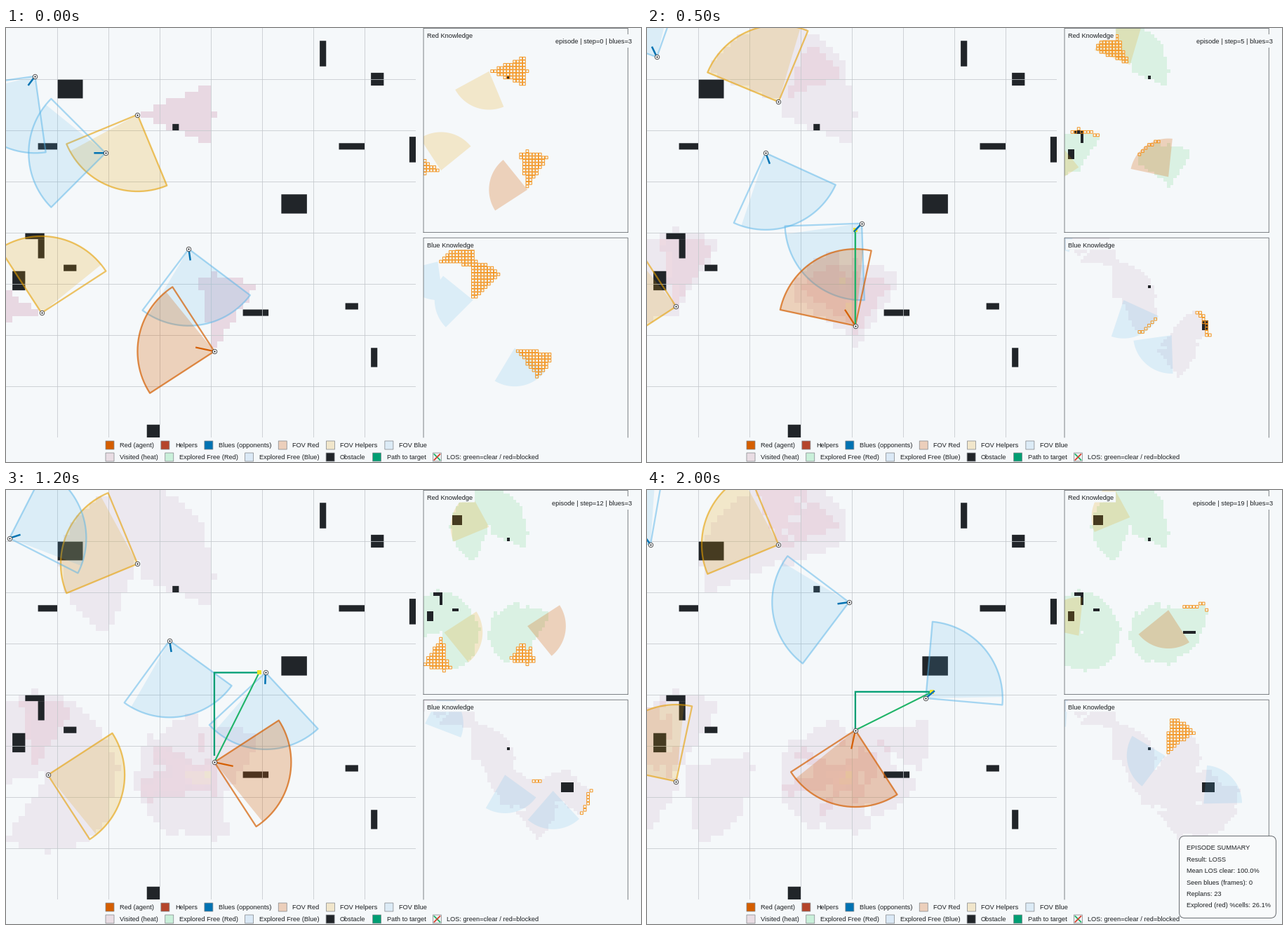
A matplotlib script that plays this animation: 905 by 619 pixels, repeating every 2.1 s.

```python
import numpy as np
import matplotlib.pyplot as plt
from matplotlib.animation import FuncAnimation
from matplotlib.collections import PolyCollection
from matplotlib.colors import LinearSegmentedColormap
from matplotlib.patches import FancyBboxPatch, PathPatch, Rectangle
from matplotlib.path import Path

W, H, DPI = 905, 619, 64
PX = 72 / DPI                      # one pixel in points
U = 73 / 96                        # layout unit: map cells are 12 units wide
N, REACH, LAST = 64, 12, 19        # map size, view radius, last step
MID = .54                          # centre of a cell
BG, INK, DARK = "#f5f8fa", "#1c1f22", "#212529"
RED, BLUE, TEAL, LOS = "#d55e00", "#0072b2", "#009e73", "#1fb468"
ORANGE = "#f39118"

# view colour, fill alpha, outline alpha, drawing order
STYLE = {"helper": ("#e69f00", .19, .60, 4), "blue": ("#56b4e9", .16, .50, 5),
         "red": (RED, .25, .70, 6)}

OBSTACLES = [(8, 8, 4, 3), (49, 2, 1, 4), (57, 7, 2, 2), (63, 17, 1, 4),
             (5, 18, 3, 1), (52, 18, 4, 1), (26, 15, 1, 1), (43, 26, 4, 3),
             (3, 32, 3, 1), (5, 33, 1, 3), (9, 37, 2, 1), (1, 38, 2, 3),
             (37, 44, 4, 1), (53, 43, 2, 1), (57, 50, 1, 3), (22, 62, 2, 2)]
wall = np.zeros((N, N), bool)
for c, r, w, h in OBSTACLES:
    wall[r:r + h, c:c + w] = True

steps = np.arange(LAST + 1)


def walk(kind, *keys, start=0, turn=None):
    """Agent moving cell by cell through (step, col, row, heading) points.

    With turn set, headings count whole turns of that many degrees."""
    at, col, row, heading = np.array(keys, float).T
    col, row = (np.ceil(np.interp(steps, at, v) - .5).astype(int)
                for v in (col, row))
    heading = np.interp(steps, at, heading)
    if turn:
        heading = start + turn * np.floor(heading + .5)
    return dict(kind=kind, col=col, row=row, heading=heading)


# the red agent turns on every third step and moves up on the others
thirds = steps // 3
red = dict(kind="red", col=0 * steps + 32, row=50 - steps + thirds,
           heading=192 + 45 * thirds)
helpers = [
    walk("helper", (0, 20, 13, 0), (1, 20, 13, 1), (3, 20, 11, 1),
         (7, 20, 11, 5), (9, 20, 11, 3), (12, 20, 11, 2), (15, 20, 9, 1),
         (19, 20, 8, 2), start=112.5, turn=45),
    walk("helper", (0, 5, 44, 0), (3, 4, 44, 2), (6, 4, 43, 2), (7, 4, 43, 3),
         (9, 5, 43, 4), (12, 6, 44, 6), (15, 5, 45, 8), (19, 4, 45, 9),
         start=282, turn=-45),
]
blues = [
    walk("blue", (0, 4, 7, 127), (3, 2, 4, 232), (7, 0, 4, 257),
         (9, 0, 4, 282), (12, 0, 7, 342), (15, 0, 9, 326), (19, 0, 8, 235)),
    walk("blue", (0, 15, 19, 180), (3, 17, 18, 68), (7, 20, 20, 71),
         (9, 22, 21, 55), (12, 25, 23, 81), (15, 28, 21, 120),
         (18, 30, 18, 130), (19, 31, 17, 172)),
    walk("blue", (0, 28, 34, 82), (2, 30, 33, 142), (7, 35, 28, 127),
         (9, 37, 28, 103), (12, 40, 28, 92), (14, 42, 28, 98),
         (15, 42, 28, 100), (18, 44, 31, 0), (19, 43, 32, -40)),
]
reds = helpers + [red]
gy, gx = np.mgrid[:N, :N]


def seen(a, s):
    """Cells sensed by an agent: a 45 degree sector, mirrored to the drawn one."""
    dx, dy = gx - a["col"][s], gy - a["row"][s]
    dist = np.hypot(dx, dy)
    off = np.degrees(np.arctan2(dy, dx)) - (112.5 - a["heading"][s])
    off = (off + 180) % 360 - 180
    return (dist > 0) & (dist <= REACH) & (abs(off) <= 22.501)


def explore(team):
    """Per step: (visit counts, cells known before, new cells)."""
    count, log = np.zeros((N, N), int), []
    for s in steps:
        known = count > 0
        count = count + sum(seen(a, s).astype(int) for a in team)
        log.append((count, known, (count > 0) & ~known))
    return log


red_log, blue_log = explore(reds), explore(blues)
HEAT = LinearSegmentedColormap.from_list("heat", [
    (0, "#ece9f0"), (.4, "#ece8ef"), (.5, "#e8d8e2"), (.8, "#eddae2"),
    (1, "#ede3d3")])


def heat_image(count):
    t = count / max(2, count.max())
    img = HEAT(t)
    img[..., 3] = t > .11
    return img


def known_image(known, new, rgb):
    img = np.zeros((N, N, 4))
    img[known] = (*rgb, 1)
    img[(known | new) & wall] = (.13, .145, .16, 1)
    return img


def sector(a, s, span):
    ang = np.radians(a["heading"][s] - 45 + np.linspace(0, span, 31))
    x, y = a["col"][s] + MID, a["row"][s] + MID
    arc = np.c_[x + REACH * np.cos(ang), y + REACH * np.sin(ang)]
    return np.vstack([(x, y), arc, (x, y)])


plt.rcParams["font.family"] = "Liberation Sans"
fig = plt.figure(figsize=(W / DPI, H / DPI), dpi=DPI, facecolor=BG)


def make_axes(x, y, w, h, xmax, ymax, z=1):
    ax = fig.add_axes([x / W, 1 - (y + h) / H, w / W, h / H], zorder=z)
    ax.set(xlim=(0, xmax), ylim=(ymax, 0), autoscale_on=False)
    ax.axis("off")
    return ax


MAP, SIDE = 768 * U, 384 * U
LEFT, BLUE_TOP = 782 * U, 393 * U
main = make_axes(0, 0, MAP, MAP, N, N)
red_ax = make_axes(LEFT, 0, SIDE, SIDE, N, N)
blue_ax = make_axes(LEFT, BLUE_TOP, SIDE, MAP - BLUE_TOP,
                    N, N * (MAP - BLUE_TOP) / SIDE)
over = make_axes(0, 0, W, H, W, H, 2)


def layer(ax):
    lim = ax.get_xlim(), ax.get_ylim()
    im = ax.imshow(np.zeros((N, N, 4)), extent=(0, N, N, 0), aspect="auto",
                   interpolation="nearest", zorder=1)
    ax.set(xlim=lim[0], ylim=lim[1])
    return im


def line(ax, color, width, z, xs=(), ys=(), **kw):
    return ax.plot(xs, ys, color=color, lw=width * PX, zorder=z, snap=False,
                   **kw)[0]


class Fills:
    """Sectors of a group as one shape, so overlaps do not darken."""

    def __init__(self, ax, group):
        self.group = group
        color, alpha, _, z = STYLE[group[0]["kind"]]
        self.patch = ax.add_patch(PathPatch(Path([(0, 0), (0, 0)]), fc=color,
                                            ec="none", alpha=alpha, zorder=z))

    def update(self, s):
        self.patch.set_path(Path.make_compound_path(
            *(Path(sector(a, s, 84), closed=True) for a in self.group)))


class Panel:
    def __init__(self, ax, groups, log, rgb):
        self.log, self.rgb = log, rgb
        self.img = layer(ax)
        self.fills = [Fills(ax, g) for g in groups]
        self.fresh = PolyCollection([], facecolors="none", edgecolors=ORANGE,
                                    linewidths=1.25 * U * PX, zorder=7,
                                    joinstyle="miter", snap=False)
        ax.add_collection(self.fresh, autolim=False)

    def update(self, s):
        _, known, new = self.log[s]
        self.img.set_data(known_image(known, new, self.rgb))
        for f in self.fills:
            f.update(s)
        corners = np.array([(1, 1), (11, 1), (11, 11), (1, 11)]) / 12
        self.fresh.set_verts([corners + (c, r) for r, c in np.argwhere(new)])


class View:
    """Outline, heading tick and position marker of one agent on the map."""

    def __init__(self, a):
        self.a, kind = a, a["kind"]
        color, _, alpha, z = STYLE[kind]
        self.edge = line(main, color, 3 * U, z + .5, alpha=alpha,
                         solid_joinstyle="round")
        size, tint, width = {"red": (3, RED, 2.2), "blue": (1.8, BLUE, 2.5),
                             "helper": (0, "none", 1)}[kind]
        self.size = size
        self.tick = line(main, tint, width, 9, solid_capstyle="butt")
        self.ring = line(main, INK, 1, 10, marker="o", ms=6.4 * PX, mfc="w",
                         mec="#555555", mew=PX)
        self.dot = line(main, INK, 1, 11, marker="o", ms=2.2 * PX, mew=0)

    def update(self, s):
        a = self.a
        x, y = a["col"][s] + MID, a["row"][s] + MID
        t = np.radians(a["heading"][s])
        self.edge.set_data(*sector(a, s, 90).T)
        self.tick.set_data([x, x + self.size * np.cos(t)],
                           [y, y + self.size * np.sin(t)])
        for mark in (self.ring, self.dot):
            mark.set_data([x], [y])


heat = layer(main)
for c, r, w, h in OBSTACLES:
    main.add_patch(Rectangle((c, r), w, h, fc=DARK, ec="none", zorder=2,
                             snap=False))
for k in range(8, N, 8):
    g = k + 1 / 24
    line(main, "#c2c7cb", U, 3, (g, g), (0, N))
    line(main, "#c2c7cb", U, 3, (0, N), (g, g))

parts = [Panel(red_ax, [helpers, [red]], red_log, (.855, .949, .894)),
         Panel(blue_ax, [blues], blue_log, (.928, .916, .940))]
parts += [Fills(main, g) for g in (helpers, blues, [red])]
parts += [View(a) for a in blues + reds]

route = line(main, TEAL, 3 * U, 8, solid_joinstyle="miter",
             solid_capstyle="butt")
sight = line(main, LOS, 2.1, 8)
goal = line(main, "#f0e62a", 1, 8.5, marker="s", ms=6.5 * PX, mew=0)


def update_route(s):
    """Path and sight line to where the third blue was one step ago."""
    x, y = red["col"][s] + MID, red["row"][s] + MID
    tx, ty = (blues[2][k][max(s - 1, 0)] + MID for k in ("col", "row"))
    start = y - 1 if s % 3 == 0 else y
    route.set_data([x, x, tx], [start, ty, ty])
    sight.set_data([x, tx], [y, ty])
    goal.set_data([tx], [ty])
    for ln in (route, sight, goal):
        ln.set_visible(s > 0)


def box(x, y, w, h, fc, ec="none", z=1):
    return over.add_patch(Rectangle((x, y), w, h, fc=fc, ec=ec, lw=U * PX,
                                    zorder=z, snap=False))


def label(x, y, s, z=4, **kw):
    return over.text(x, y + 3.4, s, size=9.25 * PX, color=INK, zorder=z, **kw)


def text_width(t):
    return t.get_window_extent(fig.canvas.get_renderer()).width


x0, x1, half = LEFT + U / 2, LEFT + SIDE - U / 2, U / 2
for top, bottom, name in ((0, SIDE, "Red Knowledge"),
                          (BLUE_TOP, H, "Blue Knowledge")):
    end = min(bottom - half, MAP)
    line(over, "#5a5e62", U, 1, [x0, x0, x1, x1],
         [end, top + half, top + half, end])
    if bottom < MAP:
        line(over, "#5a5e62", U, 1, [x0, x1], [end, end])
    title = label(600, top + 10.5, name)
    box(597, top + 2.5, text_width(title) + 6, 15, BG, z=2)
status_box = box(0, 9, 1, 19, BG, z=2)
status = label(892, 18.5, "", ha="right")

LEGEND = [
    (595, [(RED, "Red (agent)"), ("#b5452b", "Helpers"),
           (BLUE, "Blues (opponents)"), ("#eccfbb", "FOV Red"),
           ("#f1e6cb", "FOV Helpers"), ("#dcebf6", "FOV Blue")]),
    (612, [("#e9dde4", "Visited (heat)"), ("#c9f0da", "Explored Free (Red)"),
           ("#dbe9f6", "Explored Free (Blue)"), (DARK, "Obstacle"),
           (TEAL, "Path to target"),
           ("#eef1f2", "LOS: green=clear / red=blocked")]),
]
for y, items in LEGEND:
    x = 142
    for color, name in items:
        box(x, y - 6, 12, 12, color, "#85898d")
        swatch = x
        x += 30 + text_width(label(x + 20, y, name))
for ends, color in (((608, 616), LOS), ((616, 608), "#d8402f")):
    line(over, color, 1.8, 2, [swatch + 2, swatch + 10], ends)

summary = [over.add_patch(FancyBboxPatch(
    (758.5, 493.5), 138, 117, boxstyle="round,pad=0,rounding_size=8",
    fc="#f8fafb", ec="#6a6e72", lw=PX, zorder=5))]
for k, text in enumerate(["EPISODE SUMMARY", "Result: LOSS",
                          "Mean LOS clear: 100.0%", "Seen blues (frames): 0",
                          "Replans: 23", "Explored (red) %cells: 26.1%"]):
    summary.append(label(769, 510 + 16.4 * k, text, z=6))


def update(i):
    s = min(i, LAST)
    heat.set_data(heat_image(red_log[s][0]))
    for part in parts:
        part.update(s)
    update_route(s)
    status.set_text(f"episode | step={s} | blues=3")
    left = 892 - text_width(status) - 4
    status_box.set_bounds(left, 9, 896 - left, 19)
    for item in summary:
        item.set_visible(i > LAST)
    return []


anim = FuncAnimation(fig, update, frames=LAST + 2, interval=100, repeat=True,
                     repeat_delay=0, init_func=lambda: update(0))
plt.show()
```
